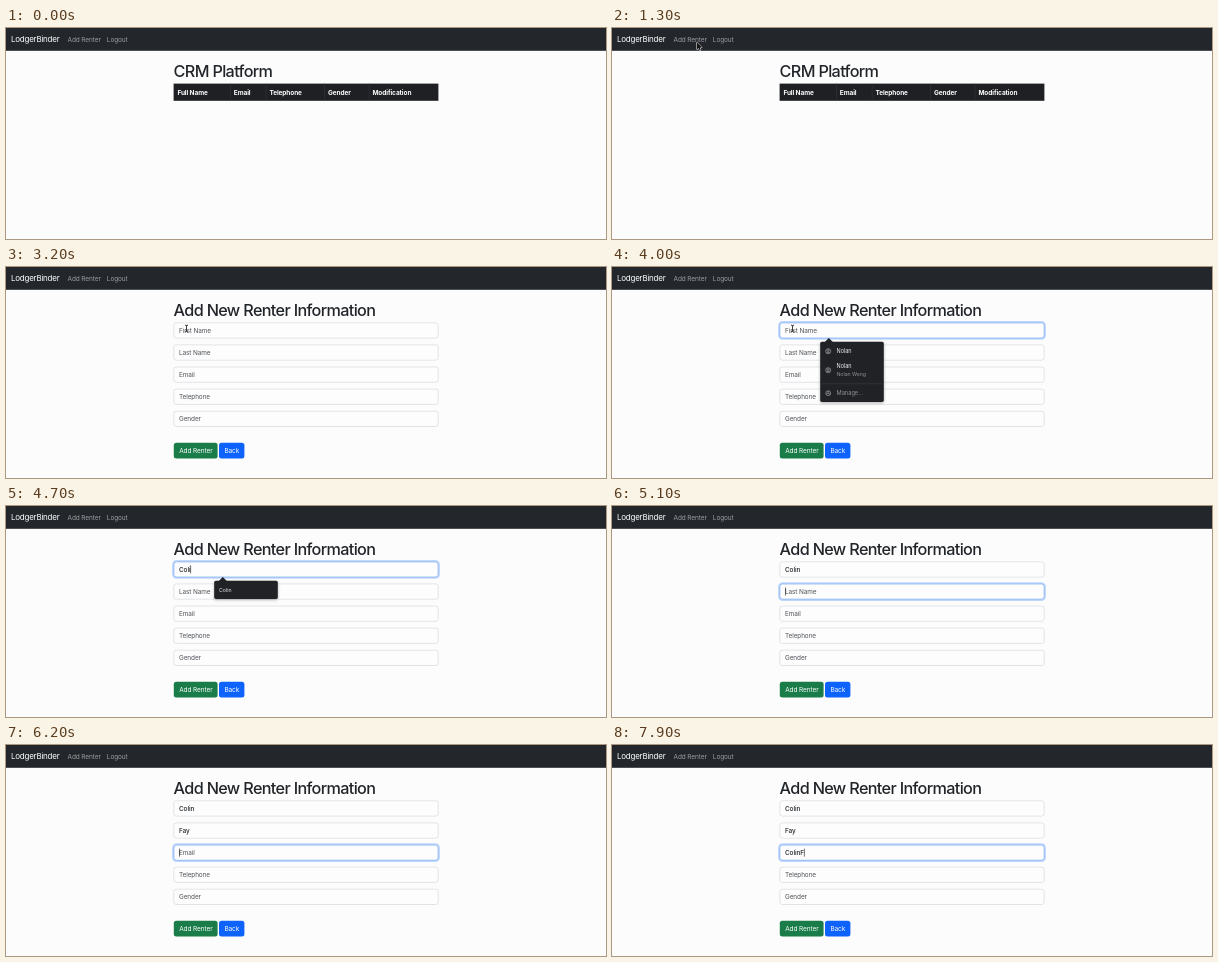
An HTML page with a canvas for the animation above (8000 ms loop, 600x211 px).

```html
<!DOCTYPE html>
<html lang="en">
<head>
<meta charset="utf-8">
<title>Renter form</title>
<style>
  html, body { margin: 0; width: 100%; height: 100%; overflow: hidden; background: #fcfcfc; }
  canvas { display: block; width: 600px; height: 211px; }
</style>
</head>
<body>
<canvas id="stage"></canvas>
<script>
const W = 600, H = 211, LOOP = 8000, STEP = 100;
const canvas = document.getElementById('stage');
const ctx = canvas.getContext('2d');
const dpr = window.devicePixelRatio || 1;
canvas.width = W * dpr;
canvas.height = H * dpr;

const INK = '#212529', HINT = '#505459', DARK = '#202226';
const FIELDS = ['First Name', 'Last Name', 'Email', 'Telephone', 'Gender'];
const FOCUS = [3400, 5000, 6000];
const TYPING = [
  { text: 'Colin', at: [4200, 4400, 4500, 4700, 4800] },
  { text: 'Fay', at: [5500, 5700, 5800] },
  { text: 'ColinF', at: [6700, 7000, 7200, 7400, 7600, 7900] }
];
// time, x, y of the pointer tip
const PATH = [
  [200, 332, 160], [300, 239.5, 41.5], [400, 239.5, 41.5], [500, 185, 35],
  [600, 146, 29.5], [700, 146, 29.5], [1300, 85, 14.5], [1600, 85, 14.5],
  [1700, 83.5, 11.5], [2500, 83.5, 11.5], [3200, 180.5, 61.5], [4200, 180.5, 61.5]
];

const clamp = v => Math.max(0, Math.min(1, v));
const ramp = (t, start, span = 200) => clamp((t - start) / span);
const ease = u => u * u * (3 - 2 * u);

function text(str, x, y, size, color, weight = 400, spacing = -0.1) {
  ctx.font = `${weight} ${size}px Inter, "Open Sans", sans-serif`;
  ctx.letterSpacing = spacing + 'px';
  ctx.fillStyle = color;
  ctx.fillText(str, x, y);
  return ctx.measureText(str).width;
}

function box(x, y, w, h, r, fill, stroke, line = 0.5) {
  ctx.beginPath();
  ctx.roundRect(x, y, w, h, r);
  if (fill) { ctx.fillStyle = fill; ctx.fill(); }
  if (stroke) { ctx.strokeStyle = stroke; ctx.lineWidth = line; ctx.stroke(); }
}

function poly(points, fill, stroke, line = 0.7) {
  ctx.beginPath();
  points.forEach(([x, y]) => ctx.lineTo(x, y));
  ctx.closePath();
  if (stroke) { ctx.strokeStyle = stroke; ctx.lineWidth = line; ctx.stroke(); }
  ctx.fillStyle = fill;
  ctx.fill();
}

function heading(str) {
  text(str, 167.6, 48.8, 16.2, INK, 500, -0.65);
}

function navbar(t) {
  ctx.fillStyle = '#23272b';
  ctx.fillRect(0, 0, W, 22.8);
  text('LodgerBinder', 5, 14.3, 8, '#fff', 400, -0.25);
  const hover = ramp(t, 1600) * (1 - ramp(t, 2600));
  text('Add Renter', 61.5, 14.1, 6.5, `rgba(255,255,255,${0.55 + 0.2 * hover})`);
  text('Logout', 100.8, 14.1, 6.5, 'rgba(255,255,255,.55)');
}

function table() {
  heading('CRM Platform');
  ctx.fillStyle = '#1e2024';
  ctx.fillRect(167.6, 55.6, 264.8, 17.2);
  ctx.fillStyle = '#373b40';
  for (const x of [224.2, 259.8, 318.4, 362.8]) ctx.fillRect(x, 55.6, 0.5, 17.2);
  const heads = [['Full Name', 171.4], ['Email', 227.8], ['Telephone', 263.4],
                 ['Gender', 322], ['Modification', 366.4]];
  for (const [label, x] of heads) text(label, x, 66.6, 6.5, '#fff', 700, -0.1);
}

function typed(i, t) {
  const entry = TYPING[i];
  return entry ? entry.text.slice(0, entry.at.filter(a => a <= t).length) : '';
}

function caretOn(i, t) {
  const last = Math.max(FOCUS[i], ...TYPING[i].at.filter(a => a <= t));
  return (t - last) % 1000 < 500;
}

function field(i, t) {
  const y = 55.8 + i * 22.1;
  const start = FOCUS[i] ?? Infinity, end = FOCUS[i + 1] ?? Infinity;
  const glow = ramp(t, start - 100) * (i < 2 ? 1 - ramp(t, end - 100) : 1);
  if (glow > 0) box(167.8, y, 264.4, 15.3, 2.6, null, `rgba(13,110,253,${0.25 * glow})`, 3.4);
  box(167.8, y, 264.4, 15.3, 2.5, '#fdfdfd', '#cfd3d8', 0.6);
  if (glow > 0) box(167.8, y, 264.4, 15.3, 2.5, null, `rgba(134,183,254,${glow})`, 0.8);

  const value = typed(i, t);
  const width = text(value || FIELDS[i], 173, y + 10, 6.45, value ? INK : HINT, value ? 500 : 400, -0.1);
  if (t >= start && t < end && caretOn(i, t)) {
    ctx.fillStyle = '#111';
    ctx.fillRect(173 + (value ? width : 0), y + 3.6, 0.6, 8);
  }
}

function button(label, x, w, color) {
  box(x, 175.8, w, 15.6, 2.5, color);
  text(label, x + 5.4, 185.9, 6.5, '#fff');
}

function person(x, y) {
  ctx.strokeStyle = '#b4b6ba';
  ctx.lineWidth = 0.6;
  ctx.beginPath();
  ctx.arc(x, y, 2.5, 0, 7);
  ctx.moveTo(x + 0.9, y - 0.6);
  ctx.arc(x, y - 0.6, 0.9, 0, 7);
  ctx.moveTo(x - 1.7, y + 1.8);
  ctx.quadraticCurveTo(x, y + 0.3, x + 1.7, y + 1.8);
  ctx.stroke();
}

function manage(y, right) {
  ctx.fillStyle = '#3c3f43';
  ctx.fillRect(208, y - 9.6, right - 208, 0.5);
  ctx.strokeStyle = '#b4b6ba';
  ctx.lineWidth = 0.6;
  ctx.beginPath();
  ctx.arc(216.2, y, 2.4, 0, 7);
  for (let k = 0; k < 3; k++) {
    const a = k * Math.PI * 2 / 3 - Math.PI / 2;
    ctx.moveTo(216.2, y);
    ctx.lineTo(216.2 + 2.4 * Math.cos(a), y + 2.4 * Math.sin(a));
  }
  ctx.stroke();
  text('Manage...', 224.5, y + 2, 5.7, '#8d9094', 400, 0);
}

function popup(y, w, h) {
  ctx.save();
  ctx.shadowColor = 'rgba(0,0,0,.3)';
  ctx.shadowBlur = 3 * dpr;
  ctx.shadowOffsetY = dpr;
  box(208.2, y, w, h, 1.8, DARK);
  ctx.restore();
  poly([[212.8, y + 0.2], [216.8, y - 3.8], [220.8, y + 0.2]], DARK);
}

function suggestions(t) {
  const white = '#eceded', grey = '#8d9094';
  if (t >= 3700 && t < 4200) {
    popup(74.8, 63.6, 60.2);
    person(216.2, 84.2);
    text('Nolan', 224.5, 86.1, 5.5, white, 400, 0);
    person(216.2, 103.2);
    text('Nolan', 224.5, 100.8, 5.5, white, 400, 0);
    text('Nolan Weng', 224.5, 109.3, 5.2, grey, 400, -0.05);
    manage(126.2, 271.8);
  } else if (t >= 4200 && t < 5000) {
    popup(74.8, 63.6, 18.2);
    text('Colin', 213, 86, 5.2, white, 400, 0);
  } else if (t >= 5500 && t < 5700) {
    popup(97, 102.8, 45.2);
    person(216.2, 110.8);
    text('Fung', 224.5, 108, 5.5, white, 400, 0);
    text('fungn@student.velmontcollege.ca', 224.5, 116.5, 5.2, grey, 400, -0.08);
    manage(133.4, 311);
  }
}

function form(t) {
  heading('Add New Renter Information');
  FIELDS.forEach((_, i) => field(i, t));
  button('Add Renter', 167.8, 43.8, '#197c49');
  button('Back', 213, 25.4, '#0d63fb');
  suggestions(t);
}

function arrow(x, y) {
  poly([[0, 0], [0, 7], [1.6, 5.6], [2.7, 8], [3.8, 7.5], [2.8, 5.2], [4.9, 5.1]]
    .map(([a, b]) => [x + a, y + b]), '#111', '#fff', 1);
}

function hand(x, y) {
  poly([[0, 0], [0.9, 0], [0.9, 2.5], [3.4, 3.2], [3.4, 5.2], [2.7, 6.8], [0, 6.8],
        [-1.7, 4.5], [-1.2, 3.9], [0, 4.6]]
    .map(([a, b]) => [x + a, y + b]), '#fff', '#111', 0.9);
}

function beam(x, y) {
  ctx.beginPath();
  ctx.moveTo(x - 1.5, y - 3.4);
  ctx.quadraticCurveTo(x, y - 3.4, x, y - 2.4);
  ctx.quadraticCurveTo(x, y - 3.4, x + 1.5, y - 3.4);
  ctx.moveTo(x, y - 2.6);
  ctx.lineTo(x, y + 2.6);
  ctx.moveTo(x - 1.5, y + 3.4);
  ctx.quadraticCurveTo(x, y + 3.4, x, y + 2.4);
  ctx.quadraticCurveTo(x, y + 3.4, x + 1.5, y + 3.4);
  ctx.strokeStyle = '#111';
  ctx.lineWidth = 0.8;
  ctx.stroke();
}

function pointer(t) {
  const k = PATH.findIndex(p => p[0] > t);
  if (k < 1) return;
  const [t0, x0, y0] = PATH[k - 1], [t1, x1, y1] = PATH[k];
  const u = ease((t - t0) / (t1 - t0));
  const x = x0 + (x1 - x0) * u, y = y0 + (y1 - y0) * u;
  if (t >= 1700 && t < 2600) hand(x, y);
  else if (t >= 3100) beam(x, y);
  else arrow(x, y);
}

function frame(now) {
  const t = Math.floor((now % LOOP) / STEP) * STEP;
  ctx.setTransform(dpr, 0, 0, dpr, 0, 0);
  ctx.fillStyle = '#fcfcfc';
  ctx.fillRect(0, 0, W, H);
  navbar(t);
  if (t < 2300) table(); else form(t);
  pointer(t);
}

const origin = performance.now();
function tick() {
  frame(performance.now() - origin);
  requestAnimationFrame(tick);
}
tick();
</script>
</body>
</html>
```
